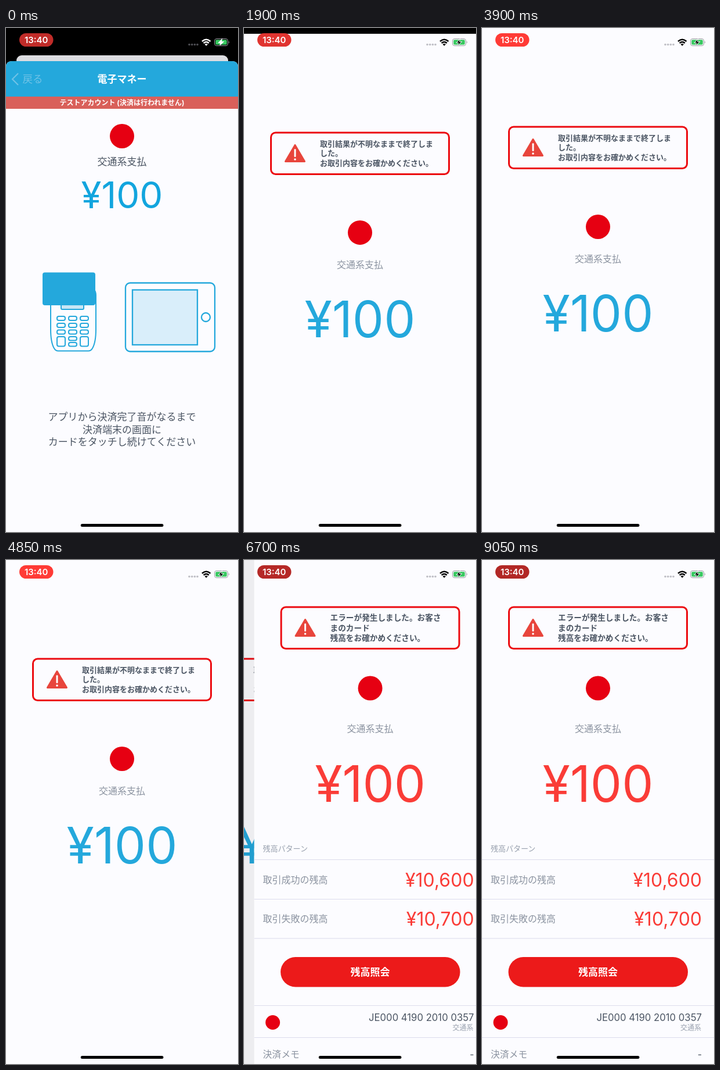
These frames come from a looping animation (400 by 867 pixels, 9100 ms). An HTML page:

```html
<!DOCTYPE html>
<html lang="ja">
<head>
<meta charset="utf-8">
<title>電子マネー</title>
<style>
  html, body { margin: 0; width: 100%; height: 100%; overflow: hidden; background: #000; }
  svg { display: block; width: 100%; height: 100%; }
  text { font-family: Inter, "Noto Sans CJK JP", "Noto Sans CJK", sans-serif; }
</style>
</head>
<body>
<svg id="stage" viewBox="0 0 400 867" xmlns="http://www.w3.org/2000/svg"></svg>
<script>
const LOOP = 9100;
const SHEET_START = 1438, PUSH_START = 6351;
const W = 400, H = 867;
const PAPER = '#fcfcff', BLUE = '#24a8dc', PALE_BLUE = '#6fc2e6';
const RED = '#ec0a10', CORAL = '#fa3c37';
const SLATE = '#4b5563', GREY = '#8b93a0', LIGHT_GREY = '#98a0ae';

// cy is the visual middle of the line
const text = (x, cy, str, size, fill, { anchor = 'start', weight = 400 } = {}) =>
  `<text x="${x}" y="${cy + size * 0.37}" font-size="${size}" fill="${fill}"
    text-anchor="${anchor}" font-weight="${weight}">${str}</text>`;
const middle = (cy, str, size, fill, weight = 400) =>
  text(200, cy, str, size, fill, { anchor: 'middle', weight });
const right = (x, cy, str, size, fill) => text(x, cy, str, size, fill, { anchor: 'end' });
const rect = (x, y, w, h, attrs) =>
  `<rect x="${x}" y="${y}" width="${w}" height="${h}" ${attrs}/>`;
const disc = (x, y, r, fill = '#e60012') => `<circle cx="${x}" cy="${y}" r="${r}" fill="${fill}"/>`;
const page = () => rect(0, 0, W, H, `fill="${PAPER}"`);

function alertBox(y, lines, size, leading) {
  const mid = y + 37;
  return rect(46.5, y + 1.5, 307, 71.5, `rx="8" fill="none" stroke="${RED}" stroke-width="3"`) +
    `<path d="M88 ${mid - 14}L104.5 ${mid + 14}H71.5Z" fill="#e8453c" stroke="#e8453c"
      stroke-width="3" stroke-linejoin="round"/>
     <path d="M88 ${mid - 6}V${mid + 5}" stroke="#fff" stroke-width="3" stroke-linecap="round"/>` +
    disc(88, mid + 10.5, 1.8, '#fff') +
    lines.map((line, i) =>
      text(131, mid + (i - 1) * leading, line, size, SLATE, { weight: 700 })).join('');
}

function reader() {
  const key = (x, y, h) => rect(x, y, 14, h, 'rx="3"');
  let keys = '';
  for (const x of [88, 108, 128]) {
    for (const y of [496, 508, 519.5]) keys += key(x, y, 7);
    keys += x === 108 ? key(x, 531, 6.5) + key(x, 541, 6.5) : key(x, 531, 16.5);
  }
  return `<g fill="none" stroke="${BLUE}" stroke-width="2">
    <path d="M77 460V518Q77 541 83 551Q85.5 555.5 90 555.5H142Q146.5 555.5 149 551Q155 541 155 518V460Q155 448 145 448H87Q77 448 77 460Z"/>
    ${rect(95, 456, 39, 28, 'rx="2" fill="#c8e6f5"')}${keys}</g>` +
    rect(63, 420.5, 91, 56.5, `rx="4" fill="${BLUE}"`);
}

const tablet = () => `<g fill="none" stroke="${BLUE}" stroke-width="2.3">
  ${rect(206, 438.5, 154, 118, 'rx="8"')}
  ${rect(218, 450.5, 112, 94.5, 'fill="#d9eefa"')}
  <circle cx="344.5" cy="497.5" r="7.5"/></g>`;

const touchScreen = () => rect(0, 0, W, H, 'fill="#000"') +
  rect(18, 47, 365, 30, 'rx="9" fill="#dcdce0"') +
  `<path d="M0 867V67Q0 57 10 57H390Q400 57 400 67V867Z" fill="${PAPER}"/>
   <path d="M0 118V67Q0 57 10 57H390Q400 57 400 67V118Z" fill="${BLUE}"/>
   <path d="M21 78L11 88L21 98" fill="none" stroke="${PALE_BLUE}" stroke-width="2.2"/>` +
  text(28.5, 88, '戻る', 17.5, PALE_BLUE) +
  middle(88, '電子マネー', 17, '#fff', 700) +
  rect(0, 118, W, 21, 'fill="#d9605a"') +
  middle(128.5, 'テストアカウント (決済は行われません)', 12, '#fff', 700) +
  disc(200, 186, 21) +
  middle(229.5, '交通系支払', 17, SLATE) +
  middle(287, '¥100', 63.5, '#12a5de') +
  reader() + tablet() +
  ['アプリから決済完了音がなるまで', '決済端末の画面に', 'カードをタッチし続けてください']
    .map((line, i) => middle(669 + i * 21.5, line, 17, SLATE)).join('');

const unknownScreen = () => page() +
  alertBox(168.5, ['取引結果が不明なままで終了しま', 'した。', 'お取引内容をお確かめください。'], 13, 16.5) +
  disc(200, 342, 21) +
  middle(397, '交通系支払', 16, GREY, 300) +
  middle(490.5, '¥100', 86, BLUE);

const balanceScreen = () => {
  const rule = y => rect(0, y, W, 1, 'fill="#dcdcec"');
  return page() +
    alertBox(79.5, ['エラーが発生しました。お客さ', 'まのカード', '残高をお確かめください。'], 13.65, 17.5) +
    disc(200, 220.5, 21) +
    middle(290.5, '交通系支払', 16, GREY, 300) +
    middle(384, '¥100', 86, CORAL) +
    text(15, 496, '残高パターン', 13, LIGHT_GREY) +
    [515, 583, 650.5, 766, 821].map(rule).join('') +
    text(15, 550.5, '取引成功の残高', 16, GREY) + right(379, 550, '¥10,600', 32, CORAL) +
    text(15, 617.5, '取引失敗の残高', 16, GREY) + right(379, 617, '¥10,700', 32, CORAL) +
    rect(45.5, 683, 309.5, 51.5, 'rx="25.7" fill="#ec1a1a"') +
    middle(709, '残高照会', 17, '#fff', 600) +
    disc(32, 795.5, 12.5) +
    right(379, 787, 'JE000 4190 2010 0357', 16.7, SLATE) +
    right(378, 804.5, '交通系', 12, LIGHT_GREY) +
    text(15, 850, '決済メモ', 15.8, GREY) + right(379, 850, '-', 16, SLATE);
};

const statusBar = () => rect(23, 9, 58.5, 23, 'id="pill" rx="11.5"') +
  text(52.2, 20.7, '13:40', 15, '#fff', { anchor: 'middle', weight: 600 }) +
  [316, 320.7, 325.4, 330].map(x =>
    `<circle cx="${x}" cy="28.5" r="1.8" fill="#8e8e98" opacity=".55"/>`).join('') +
  `<g id="icons">
    <g fill="none" stroke="currentColor" stroke-width="2.5">
      <path d="M338 23Q345.2 16.5 352.5 23"/><path d="M340.7 26Q345.2 22 349.8 26"/>
    </g>
    <path d="M345.2 30.7L342.5 28Q345.2 25.8 348 28Z" fill="currentColor"/>
    ${rect(359.5, 18.5, 23, 12, 'rx="3.5" fill="none" stroke="#9a9aa2"')}
    ${rect(361.2, 20.2, 19.6, 8.6, 'rx="2" fill="#38c860"')}
    <path d="M384 22.5Q386 24.5 384 26.5Z" fill="#9a9aa2"/>
    <path d="M371.8 20L367 25.2H370.2L369 29.2L374.5 23.8H371Z" fill="currentColor"
      stroke="${PAPER}" stroke-width="1.6" paint-order="stroke"/>
  </g>`;

const stage = document.getElementById('stage');
stage.innerHTML = `<g>${touchScreen()}</g>
  <g id="unknown">${unknownScreen()}${rect(0, 0, W, H, 'id="dim" fill="#000"')}</g>
  <g id="balance">${balanceScreen()}</g>
  ${statusBar()}
  ${rect(128.8, 853, 142.6, 5, 'rx="2.5" fill="#000"')}`;

const [unknown, dim, balance, pill, icons] =
  ['unknown', 'dim', 'balance', 'pill', 'icons'].map(id => document.getElementById(id));

// critically damped spring, 0 to 1
function spring(ms) {
  const x = Math.max(0, ms) * 0.014;
  const p = 1 - Math.exp(-x) * (1 + x);
  return p > 0.9992 ? 1 : p;
}

// recording light: holds at full brightness, then dips
function pulse(t) {
  const level = 0.7 + 0.68 * Math.cos((t - 440) / 1150 * 2 * Math.PI);
  return Math.min(1, level);
}

function draw() {
  const t = performance.now() % LOOP;
  const rise = spring(t - SHEET_START);
  const push = spring(t - PUSH_START);
  unknown.setAttribute('transform', `translate(${-0.3 * W * push} ${H * (1 - rise)})`);
  balance.setAttribute('transform', `translate(${W * (1 - push)} 0)`);
  dim.setAttribute('opacity', 0.06 * push);

  const glow = pulse(t);
  pill.setAttribute('fill', `rgb(${176 + 79 * glow},${40 + 19 * glow},${38 + 16 * glow})`);
  const shade = 255 * (1 - rise);
  icons.setAttribute('color', `rgb(${shade},${shade},${shade})`);
  requestAnimationFrame(draw);
}
draw();
</script>
</body>
</html>
```
